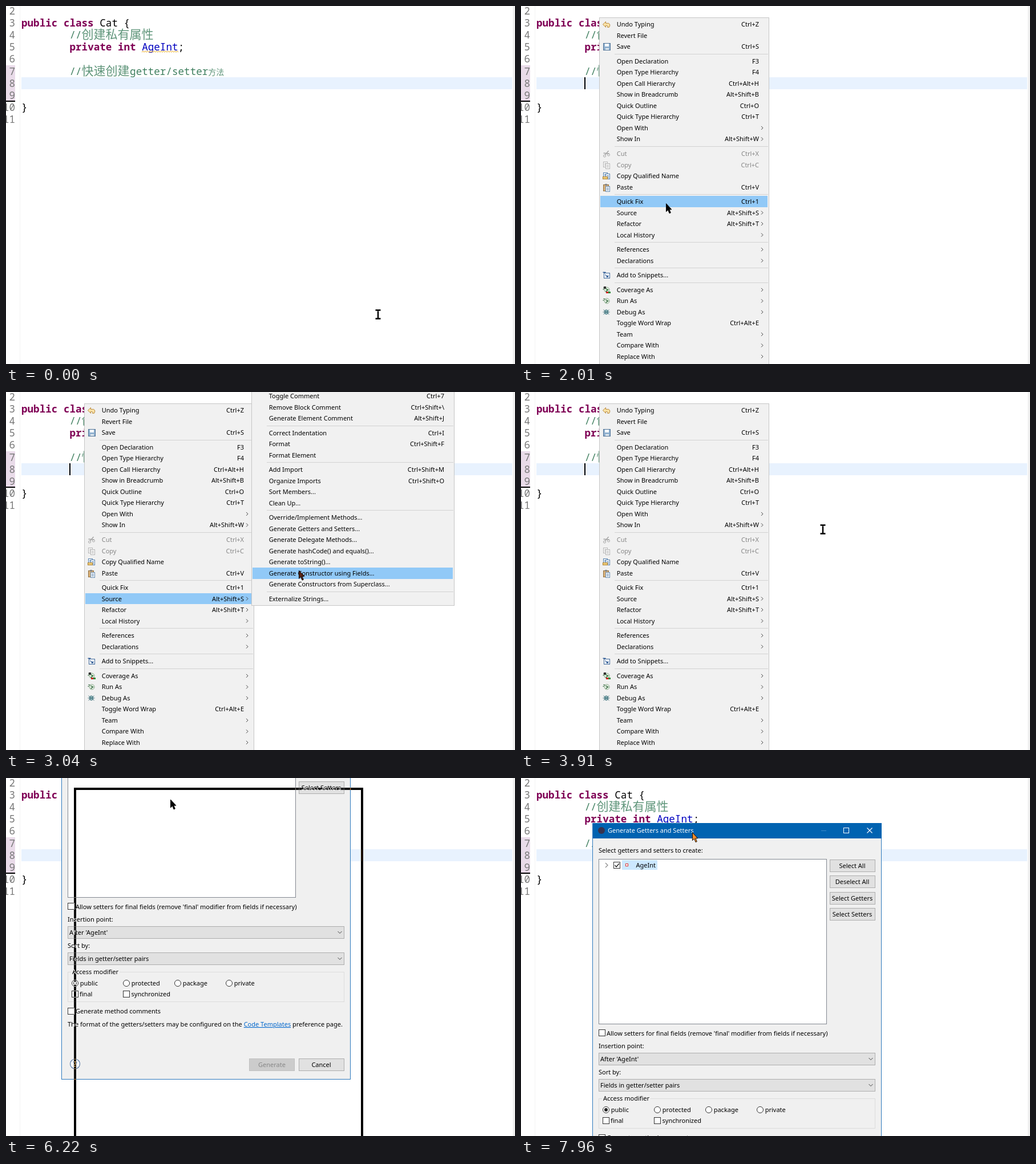
These frames come from a looping animation (892 by 628 pixels, 7990 ms). An HTML page:

```html
<!DOCTYPE html>
<html lang="en">
<head>
<meta charset="utf-8">
<title>Generate getters and setters</title>
<style>
  html, body { margin: 0; width: 100%; height: 100%; overflow: hidden; background: #fff; }
  svg { display: block; width: 892px; height: 628px; }
  text { font: 11px "Noto Sans", "Open Sans", sans-serif; white-space: pre; fill: #000; }
  .code { font: 500 17.6px "Noto Sans Mono", "DejaVu Sans Mono", monospace; }
  .kw { font-weight: 700; fill: #7f0055; }
  .note { fill: #3f7f5f; }
  .han { font-family: "Noto Sans CJK SC", "Noto Sans CJK", sans-serif; font-weight: 300; fill: #5f957a; }
  .num { fill: #787878; text-anchor: end; }
  .off { fill: #868686; }
  .end { text-anchor: end; }
  .mid { text-anchor: middle; }
  rect { shape-rendering: crispEdges; }
  #outline { mix-blend-mode: difference; }
</style>
</head>
<body>
<svg id="stage" viewBox="0 0 892 628" xmlns="http://www.w3.org/2000/svg"></svg>
<script>
const LOOP = 7990;
const CELL = 10.56;

const rect = (x, y, w, h, fill, stroke, more = '') =>
  `<rect x="${x}" y="${y}" width="${w}" height="${h}" fill="${fill}" ${stroke ? `stroke="${stroke}"` : ''} ${more}/>`;
const line = (d, stroke, width = 1) =>
  `<path d="${d}" fill="none" stroke="${stroke}" stroke-width="${width}"/>`;
const text = (x, y, s, cls = '', more = '') =>
  `<text x="${x}" y="${y}" class="${cls}" ${more}>${s}</text>`;
const label = (x, mid, s, cls, more) => text(x, mid + 4, s, cls, more);
const group = (id, body) => `<g id="${id}">${body}</g>`;

// Editor
const baseline = n => 14.6 + 21.19 * (n - 2);
const code = (col, row, s, cls = '', more) =>
  text(27 + col * CELL, baseline(row), s, 'code ' + cls, more);

function editor() {
  let out = rect(0, 0, 892, 628, '#fff') + rect(24, 0, 1, 628, '#f3f3f3') +
    rect(888, 0, 4, 628, '#f0f0f0') + rect(27, 125, 860, 21, '#e8f2fe') +
    rect(0, 104, 16, 62, '#e9dbe9') + rect(0, 166, 16, 2, '#000');
  for (let n = 2; n <= 11; n++) out += text(16, baseline(n), n, 'code num');
  const zigzag = 'M238 81' + 'l2 -2l2 2'.repeat(16);
  return out +
    code(0, 3, 'public class', 'kw') + code(13, 3, 'Cat {') +
    code(8, 4, '//', 'note') + code(10, 4, '创建私有属性', 'note han', 'style="font-size:21px"') +
    code(8, 5, 'private int', 'kw') + code(20, 5, 'AgeInt', '', 'style="fill:#0000c0"') + code(26, 5, ';') +
    line(zigzag, '#f0c468', 1.2) +
    code(8, 7, '//', 'note') + code(10, 7, '快速创建', 'note han', 'style="font-size:21px"') +
    code(18, 7, 'getter/setter', 'note') + code(31, 7, '方法', 'note han', 'style="font-size:14px"') +
    code(0, 10, '}') + rect(111, 125, 2, 21, '#000', '', 'id="caret"');
}

// Menus
const page = (x, y, c) => rect(x, y, 7, 9, '#fff', c) + line(`M${x + 2} ${y + 3}h4m-4 2h4m-4 2h4`, c);
const runner = c => `<circle cx="1" cy="0" r="4.5" fill="#e4efe4" stroke="#8aa88a"/>` +
  line('M-1 -2l4 2l-4 3M-5 -4l3 1m-4 2h2', c, 1.4);
const icons = {
  'Undo Typing': '<path d="M-6 0l5 -5v3h5q4 2 1 7h-3q2 -3 -3 -3v3z" fill="#fbe3a8" stroke="#b98a3c"/>',
  'Save': rect(-5.5, -5.5, 12, 12, '#8fb0cf', '#4f7296') + rect(-3, -5, 7, 5, '#f4f8fb') + rect(-2, 3, 6, 3, '#dfe8ee'),
  'Cut': line('M4 -5l-6 7M-5 -1l10 1', '#a5a5a5', 1.5) +
    '<circle cx="-3" cy="4" r="2" fill="none" stroke="#a5a5a5"/><circle cx="4" cy="2" r="2" fill="none" stroke="#a5a5a5"/>',
  'Copy': page(-5.5, -5.5, '#b4b4b4') + page(-1.5, -2.5, '#b4b4b4'),
  'Copy Qualified Name': page(-5.5, -5.5, '#5580ae') + page(-1.5, -3.5, '#5580ae') + rect(-6, 1, 8, 4, '#eecb76', '#ad8337'),
  'Paste': rect(-5.5, -4.5, 9, 11, '#d7b07a', '#94713f') + rect(-3, -6, 4, 3, '#888') + page(-1.5, -1.5, '#668cb3'),
  'Add to Snippets...': rect(-4.5, -3.5, 10, 9, '#fff', '#3e689a') + line('M-6 -5h5M-2 -1l5 4m0 -3v3h-3', '#345f98', 1.4),
  'Coverage As': runner('#286e36') + rect(-5, -6, 4, 4, '#333') + rect(-1, 3, 4, 3, '#c22') + rect(3, 3, 4, 3, '#2a8c3a'),
  'Run As': runner('#3b6d45'),
  'Debug As': '<ellipse rx="3" ry="4" fill="#9fc3c6" stroke="#40727c"/>' + line('M-5 -4l10 8M5 -4l-10 8M-6 0h12', '#40727c')
};

// "~" greys an item out, ">" opens a submenu, "-" is a separator.
const mainItems = `Undo Typing|Ctrl+Z
Revert File
Save|Ctrl+S
-
Open Declaration|F3
Open Type Hierarchy|F4
Open Call Hierarchy|Ctrl+Alt+H
Show in Breadcrumb|Alt+Shift+B
Quick Outline|Ctrl+O
Quick Type Hierarchy|Ctrl+T
Open With|>
Show In|Alt+Shift+W>
-
~Cut|Ctrl+X
~Copy|Ctrl+C
Copy Qualified Name
Paste|Ctrl+V
-
Quick Fix|Ctrl+1
Source|Alt+Shift+S>
Refactor|Alt+Shift+T>
Local History|>
-
References|>
Declarations|>
-
Add to Snippets...
-
Coverage As|>
Run As|>
Debug As|>
Toggle Word Wrap|Ctrl+Alt+E
Team|>
Compare With|>
Replace With|>`;
const sourceItems = `Toggle Comment|Ctrl+7
Remove Block Comment|Ctrl+Shift+\\
Generate Element Comment|Alt+Shift+J
-
Correct Indentation|Ctrl+I
Format|Ctrl+Shift+F
Format Element
-
Add Import|Ctrl+Shift+M
Organize Imports|Ctrl+Shift+O
Sort Members...
Clean Up...
-
Override/Implement Methods...
Generate Getters and Setters...
Generate Delegate Methods...
Generate hashCode() and equals()...
Generate toString()...
Generate Constructor using Fields...
Generate Constructors from Superclass...
-
Externalize Strings...`;

function makeMenu(id, left, right, top, bottom, y, items) {
  const rows = {};
  let body = '';
  for (const item of items.split('\n')) {
    if (item === '-') {
      body += rect(left + 27, Math.round(y - 7), right - left - 29, 1, '#d2d2d2');
      y += 6.1;
      continue;
    }
    const [raw, keys = ''] = item.split('|');
    const name = raw.replace('~', ''), cls = raw === name ? '' : 'off';
    body += label(left + 30.7, y, name, cls) + label(right - 18, y, keys.replace('>', ''), 'end ' + cls);
    if (keys.endsWith('>')) body += line(`M${right - 14} ${y - 3}l3 3l-3 3`, '#444');
    if (icons[name]) body += `<g transform="translate(${left + 12.5} ${y})">${icons[name]}</g>`;
    rows[name] = y;
    y += 19.5;
  }
  const svg = group(id, rect(left + .5, top + .5, right - left - 1, bottom - top - 1, '#f1f1f1', '#c6c6c6') +
    rect(left + 2, 0, right - left - 5, 19.5, '#91c9f7', '', `id="${id}Row"`) + body);
  return { svg, rows, left, right };
}

const mainMenu = makeMenu('main', 137, 435, 20, 640, 32.3, mainItems);
const subMenu = makeMenu('sub', 430, 786, -40, 375, 7, sourceItems);

// Dialog
const check = (x, y, id = '') => rect(x + .5, y + .5, 11, 11, '#fff', '#333', id && `id="${id}"`);
const button = (y, s, x = 513) =>
  rect(x + .5, y + .5, 79, 21, '#e1e1e1', '#adadad') + label(x + 39.5, y + 11, s, 'mid');
const combo = (y, s) => rect(108.5, y + .5, 484, 21, '#e1e1e1', '#adadad') + label(111, y + 10.5, s) +
  line(`M581.5 ${y + 9}l3.5 3.5l3.5 -3.5`, '#444');
const radio = (x, s, on) => `<circle cx="${x}" cy="360" r="5.5" fill="#fff" stroke="#333"/>` +
  (on ? `<circle cx="${x}" cy="360" r="3" fill="#222"/>` : '') + label(x + 8.7, 360, s);

function dialog() {
  const tree = line('M120 -73l4 4l-4 4', '#888', 1.2) + check(134, -75) +
    group('picked', rect(149, -78, 62, 17, '#cce8ff') + line('M136.5 -69l2.5 3l5 -6', '#222', 1.4)) +
    rect(155.5, -71.5, 4, 4, '#fff', '#d33') + label(173.5, -69, 'AgeInt');
  return rect(97.5, -142.5, 506, 671, '#f0f0f0', '#2d79bd') + rect(98, -143, 506, 27, '#0063b1') +
    '<circle cx="113" cy="-130" r="6" fill="#37334f"/>' +
    label(124, -130, 'Generate Getters and Setters', '', 'style="fill:#fff"') +
    line('M498 -129.5h9', '#3d8ac8') + rect(537.5, -134.5, 9, 9, 'none', '#fff') +
    line('M578.5 -134.5l9 9m0 -9l-9 9', '#fff', 1.1) +
    label(108, -95, 'Select getters and setters to create:') +
    rect(108.5, -79.5, 399, 289, '#fff', '#828790') + tree +
    button(-79, 'Select All') + button(-51, 'Deselect All') +
    button(-22, 'Select Getters') + button(6, 'Select Setters') +
    check(108, 219, 'allow') + label(122, 225.5, "Allow setters for final fields (remove 'final' modifier from fields if necessary)") +
    label(108, 248, 'Insertion point:') + combo(260, "After 'AgeInt'") +
    label(108, 294, 'Sort by:') + combo(306, 'Fields in getter/setter pairs') +
    rect(108.5, 340.5, 484, 52, 'none', '#dcdcdc') + rect(114, 336, 85, 10, '#f0f0f0') + label(116, 340, 'Access modifier') +
    radio(121, 'public', true) + radio(211, 'protected') + radio(301, 'package') + radio(391, 'private') +
    check(115, 373) + label(129, 379, 'final') + check(205, 373) + label(219.5, 379, 'synchronized') +
    check(108, 403) + label(122, 409, 'Generate method comments') +
    label(108, 432, 'The format of the getters/setters may be configured on the ' +
      '<tspan fill="#0066cc" text-decoration="underline">Code Templates</tspan> preference page.') +
    '<circle cx="121" cy="501.5" r="8.5" fill="#f7f9fc" stroke="#5c7ba5" stroke-width="1.2"/>' +
    text(121, 507, '?', 'mid', 'style="font-size:15px;font-weight:600;fill:#3d66a8"') +
    rect(426.5, 492.5, 79, 21, '#ccc', '#bfbfbf') + label(466, 503, 'Generate', 'mid off') +
    button(492, 'Cancel');
}

const pointer = '<path id="arrow" d="M.4 .5V14.6L3.6 11.6L6 17.5L8.3 16.5L5.9 10.8H9.8Z" stroke="#000" stroke-width=".9"/>' +
  '<path id="beam" d="M-4.5 -7.5h3.5l1 1l1 -1h3.5M0 -7V7M-4.5 7.5h3.5l1 -1l1 1h3.5" fill="none" stroke-width="2.5"/>';

document.getElementById('stage').innerHTML = editor() + mainMenu.svg + subMenu.svg + group('dialog', dialog()) +
  rect(99, -141, 503, 667, 'none', '#fff', 'id="outline" stroke-width="4"') + group('cursor', pointer);

const el = {};
document.querySelectorAll('[id]').forEach(e => el[e.id] = e);

// Pointer path: time, x, y, eased
const path = [
  [20, 652, 541], [480, 137.5, 134.5, 1], [1030, 137, 134], [1690, 137, 134], [2010, 254, 346], [2130, 261, 363],
  [2310, 261, 363], [2560, 425, 367], [2800, 500, 350], [3040, 513, 313], [3100, 516, 292],
  [3130, 516, 292], [3420, 529, 241, 1], [4750, 529, 241], [4780, 527, 241], [4890, 507, 225],
  [5400, 345, 12], [5430, 335, -30], [6090, 266, -123], [6120, 269, -103], [6220, 288, 37], [6360, 294, 99],
  [6520, 294, 99], [7110, 165, 149, 1], [7280, 165, 149], [7930, 300, 95, 1]
];
const GRAB = [266, -123];
const DROP = [28, 222];

function pointerAt(t) {
  const i = path.findIndex(p => p[0] > t);
  if (i === 0) return path[0].slice(1, 3);
  if (i < 0) return path[path.length - 1].slice(1, 3);
  const a = path[i - 1], b = path[i];
  let k = (t - a[0]) / (b[0] - a[0]);
  if (b[3]) k = k * k * (3 - 2 * k);
  return [a[1] + (b[1] - a[1]) * k, a[2] + (b[2] - a[2]) * k];
}

const between = (t, a, b) => t >= a && t < b;
const show = (e, on) => e.setAttribute('visibility', on ? 'visible' : 'hidden');
const move = (e, x, y) => e.setAttribute('transform', `translate(${x.toFixed(2)} ${y.toFixed(2)})`);
// Opacity from a list of [start, value] steps
const level = (t, steps) => steps.reduce((v, [at, to]) => t >= at ? to : v, 0);

function fade(e, t, steps) {
  const v = level(t, steps);
  e.setAttribute('opacity', v);
  e.setAttribute('display', v ? 'inline' : 'none');
}

function hover(row, menu, x, y, fixed) {
  const inside = x > menu.left + 2 && x < menu.right - 2;
  const hit = fixed || (inside && Object.values(menu.rows).find(r => Math.abs(r - y) <= 9.75));
  row.setAttribute('display', hit ? 'inline' : 'none');
  if (hit) row.setAttribute('y', hit - 9.75);
}

function render(t) {
  const [x, y] = pointerAt(t);
  const subOpen = between(t, 2500, 3910);

  show(el.caret, between(t, 620, 4030));
  fade(el.main, t, [[1220, .6], [1260, 1], [3950, .5], [3990, 0]]);
  fade(el.sub, t, [[2500, .6], [2540, 1], [3910, 0]]);
  hover(el.mainRow, mainMenu, t < 3910 ? x : 0, y, between(t, 2130, 3910) && mainMenu.rows.Source);
  hover(el.subRow, subMenu, subOpen ? x : 0, y);

  fade(el.dialog, t, [[4330, .4], [4360, .75], [4390, 1]]);
  const dropped = t >= 6520;
  move(el.dialog, dropped ? DROP[0] : 0, dropped ? DROP[1] : 0);
  show(el.picked, t >= 7280);
  const overAllow = !dropped && t > 4390 && x < 511 && between(y, 219, 231);
  el.allow.setAttribute('stroke', overAllow ? '#0078d7' : '#333');

  show(el.outline, between(t, 6120, 6520));
  move(el.outline, x - GRAB[0], y - GRAB[1]);

  const beam = t < 1030 || between(t, 3910, 4330);
  show(el.beam, beam);
  show(el.arrow, !beam);
  el.beam.setAttribute('stroke', between(t, 620, 700) ? '#e07a20' : '#000');
  const pressed = between(t, 3680, 3910) || t >= 7950;
  el.arrow.setAttribute('fill', pressed ? '#f28c28' : between(t, 2900, 3130) ? '#5a2413' : '#000');
  move(el.cursor, x, y);
}

const start = performance.now();
function tick() {
  render((performance.now() - start) % LOOP);
  requestAnimationFrame(tick);
}
tick();
</script>
</body>
</html>
```
